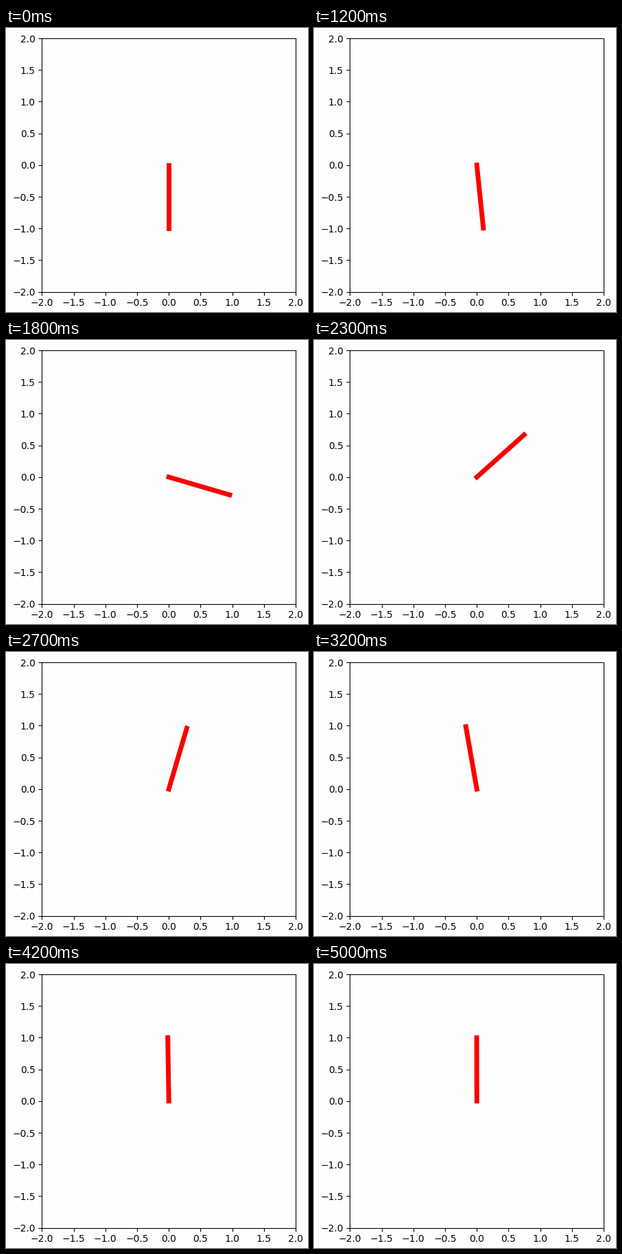
Write a matplotlib script that moves like this. It is 440 px wide and 414 px high and loops after 5900 ms.

```python
import numpy as np
import matplotlib.pyplot as plt
from matplotlib.animation import FuncAnimation

W, H, DPI = 440, 414, 100
FRAMES, STEP_MS = 59, 100
LEFT, BOTTOM, SIDE = 52.41, 29.38, 369.6
PAPER = "#fdfdfd"
EPS = 1e-3  # keeps the pixel size from being rounded down

# Swing angle (radians from hanging straight down) at a few steps.
STEPS = np.array([12, 15, 18, 21, 23, 27, 32, 33, 36, 39, 42])
ANGLES = np.array([0.103, 0.60, 1.286, 2.051, 2.30, 2.855,
                   3.315, 3.320, 3.256, 3.183, 3.158])
SLOPES = np.gradient(ANGLES, STEPS)
GROWTH, DECAY, REST = 1.54, 0.31, 50


def hermite(x):
    """Smooth curve through the swing angles."""
    i = min(np.searchsorted(STEPS, x, side="right") - 1, len(STEPS) - 2)
    h = STEPS[i + 1] - STEPS[i]
    t = (x - STEPS[i]) / h
    return ((1 + 2 * t) * (1 - t) ** 2 * ANGLES[i]
            + t * (1 - t) ** 2 * h * SLOPES[i]
            + t * t * (3 - 2 * t) * ANGLES[i + 1]
            + t * t * (t - 1) * h * SLOPES[i + 1])


def swing(step):
    """Unstable fall away from the bottom, swing up, then settle at the top."""
    step = min(step, REST)
    if step < STEPS[0]:
        return ANGLES[0] * np.exp(GROWTH * (step - STEPS[0]))
    if step > STEPS[-1]:
        return np.pi + (ANGLES[-1] - np.pi) * np.exp(-DECAY * (step - STEPS[-1]))
    return hermite(step)


fig = plt.figure(figsize=((W + EPS) / DPI, (H + EPS) / DPI), dpi=DPI,
                 facecolor=PAPER)
ax = fig.add_axes([LEFT / W, BOTTOM / H, SIDE / W, SIDE / H], facecolor=PAPER)
ax.set(xlim=(-2, 2), ylim=(-2, 2))
ticks = np.arange(-2, 2.1, 0.5)
ax.set_xticks(ticks)
ax.set_yticks(ticks)
rod, = ax.plot([], [], color="#fa0000", lw=5, solid_capstyle="projecting")


def draw(step):
    angle = swing(step)
    rod.set_data([0, np.sin(angle)], [0, -np.cos(angle)])
    return rod,


anim = FuncAnimation(fig, draw, frames=FRAMES, interval=STEP_MS,
                     repeat=True, repeat_delay=0)
plt.show()
```
